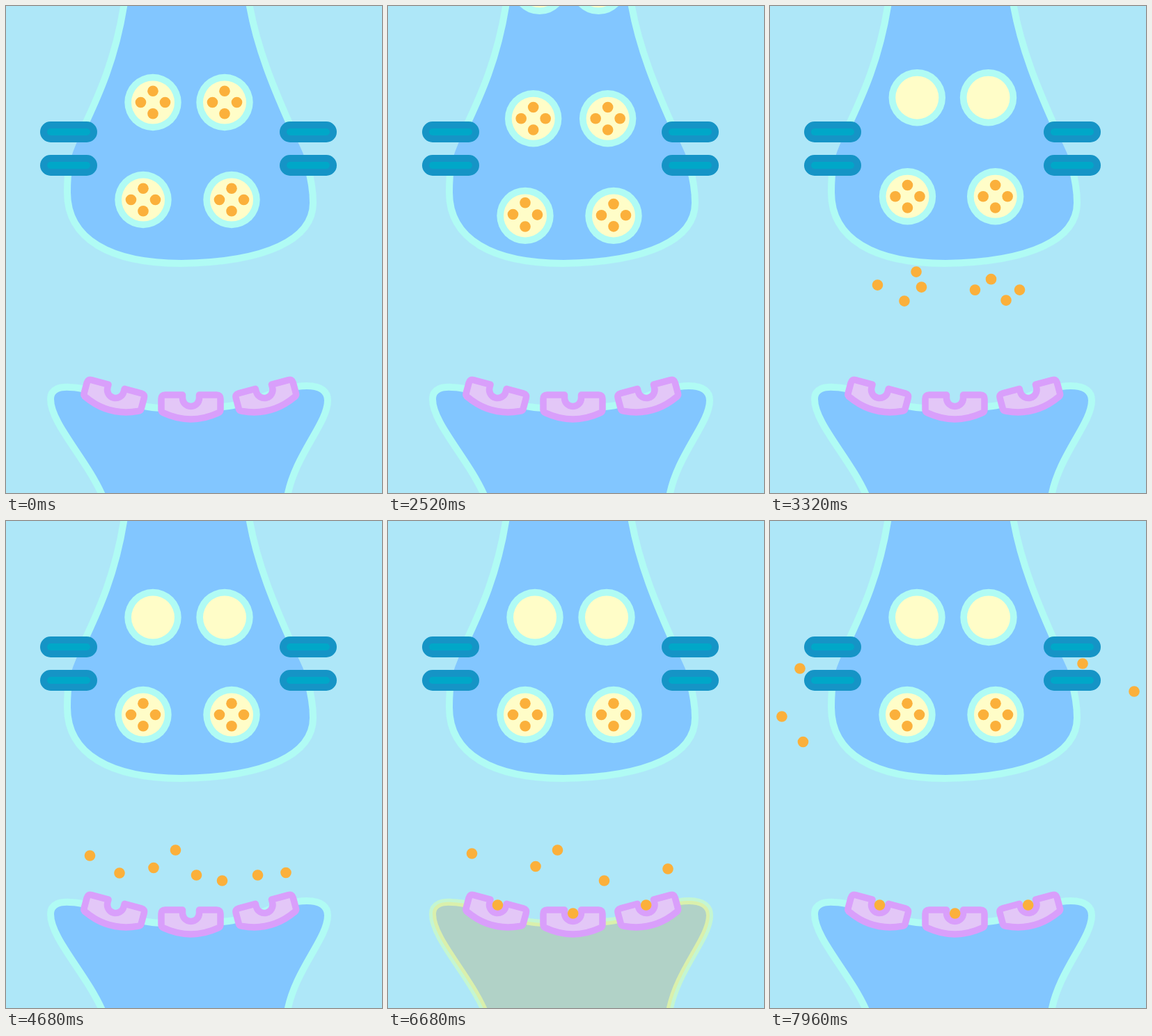
Recreate the animation shown at these times as an HTML page with a canvas. Size 540 by 700 pixels, loop 8 s.

```html
<!DOCTYPE html>
<html lang="en">
<head>
<meta charset="utf-8">
<title>Synapse</title>
<style>
html, body { margin: 0; width: 100%; height: 100%; overflow: hidden; background: #aee7f8; }
canvas { display: block; }
</style>
</head>
<body>
<canvas id="stage" width="540" height="700"></canvas>
<script>
const ctx = document.getElementById('stage').getContext('2d');
const LOOP = 8000;
const BG = '#aee7f8', CELL = '#82c6ff', MINT = '#b0fbf4', GLOW = '#ffe56a', DOT = '#fbb03b';

// Upper cell: two neck walls and a bowl, with gaps at the channels
const leftWall = 'M170 -5C157 80 130 135 109 180';
const rightWall = 'M413 182C385 120 360 60 349 -5';
const bowl = y => `91 228C88.5 241 88 255 88 268C88 335 150 ${y} 252 ${y}` +
  `C375 ${y - 2} 441 335 441 283C441 265 438 248 433 230`;
const cellPath = y => new Path2D(`${leftWall}C102 195 95 210 ${bowl(y)}C428 212 420 198 ${rightWall.slice(1)}Z`);
const wallPath = y => new Path2D(`${leftWall}M${bowl(y)}${rightWall}`);

const upper = { body: cellPath(370), wall: wallPath(370) };
const upperGlow = { body: cellPath(365), wall: wallPath(365) };
const lowerPath = new Path2D('M139 705C115 650 64 600 64 565C64 550 78 547 92 548' +
  'C130 549 160 572 210 577C240 580 290 579 320 575C360 570 395 546 432 546' +
  'C455 546 462 556 462 567C462 600 415 645 404 705');
const lower = { body: lowerPath, wall: lowerPath };

const receptor = new Path2D('M-42.5 1Q-42.5 -4.5 -37 -4.5H-12V0A12 12 0 0 0 12 0V-4.5H37' +
  'Q42.5 -4.5 42.5 1V17Q42.5 20 39 21.5Q0 39.5 -39 21.5Q-42.5 20 -42.5 17Z');
const receptors = [[157.5, 551.5, 15], [265.5, 563.5, 0], [371, 551.5, -15]];

const offsets = [[0, -16.3], [-17.5, 0], [17.5, 0], [0, 16.3]];
const docks = [[197, 278.5], [324, 278.5]];
const waiting = [[211, 138.5], [314, 138.5]];
const entries = [[219, -62], [300, -62]];

// Each dot: release point, floating point, bob [height, period], then a receptor or a drift curve
const dots = [
  { out: [210, 382], float: [243.5, 473], bob: [-4, 1000], drift: [100, 430, 47.5, 317.5] },
  { out: [154.5, 401], float: [120.5, 481], bob: [-3, 800], drift: [0, 330, 43, 212] },
  { out: [217.5, 404], float: [212, 498.5], bob: [-2, 800], drift: [70, 420, 17, 281] },
  { out: [193, 424], float: [163, 506], bob: [-2, 800], bind: [157.5, 552] },
  { out: [317.5, 392.5], float: [310.5, 517], bob: [2, 1000], drift: [420, 420, 523, 245] },
  { out: [294.5, 408], float: [273.5, 509], bob: [-2, 800], bind: [265.7, 564] },
  { out: [358.5, 408], float: [402, 505.5], bob: [-5.5, 800], drift: [500, 370, 449, 205] },
  { out: [339, 423], float: [361.5, 509], bob: [-2, 800], bind: [370.7, 552] }
];

const span = (t, a, b) => Math.min(1, Math.max(0, (t - a) / (b - a)));
const lerp = (a, b, k) => a + (b - a) * k;
const mix = (p, q, k) => [lerp(p[0], q[0], k), lerp(p[1], q[1], k)];

function disc([x, y], r, color) {
  ctx.beginPath();
  ctx.arc(x, y, r, 0, 7);
  ctx.fillStyle = color;
  ctx.fill();
}

function paint(path, fill, stroke, width) {
  if (fill) { ctx.fillStyle = fill; ctx.fill(path); }
  if (stroke) { ctx.strokeStyle = stroke; ctx.lineWidth = width; ctx.stroke(path); }
}

function bar(x, y, w, h, color) {
  ctx.beginPath();
  ctx.roundRect(x, y, w, h, h / 2);
  ctx.fillStyle = color;
  ctx.fill();
}

function glow(shape, t, start) {
  const mid = start + 425;
  const a = 0.85 * Math.min(span(t, start, mid), 1 - span(t, mid, mid + 425));
  if (a <= 0) return;
  ctx.globalAlpha = a;
  paint(shape.body, GLOW);
  ctx.globalAlpha = a * 0.65;
  paint(shape.wall, null, GLOW, 10);
  ctx.globalAlpha = 1;
}

function vesicle(center, full) {
  disc(center, 40.7, MINT);
  disc(center, 31, '#fffdc8');
  if (full) for (const [dx, dy] of offsets) disc([center[0] + dx, center[1] + dy], 7.8, DOT);
}

function dotAt(dot, i, t) {
  const dock = docks[i >> 2], off = offsets[i % 4];
  const home = [dock[0] + off[0], dock[1] + off[1]];
  if (t < 3320) {
    return [lerp(home[0], dot.out[0], span(t, 2920, 3320)), lerp(home[1], dot.out[1], span(t, 2355, 3320))];
  }
  const p = mix(dot.out, dot.float, span(t, 3320, 4210));
  const [height, period] = dot.bob;
  p[1] += height * span(t, 4210, 4510) * (1 - Math.cos(2 * Math.PI * (t - 4680) / period)) / 2;
  if (dot.bind) return mix(p, dot.bind, span(t, 4850, 5650));
  const [cx, cy, x, y] = dot.drift, u = span(t, 7180, 7960);
  return mix(mix(p, [cx, cy], u), mix([cx, cy], [x, y], u), u);
}

function draw(t) {
  ctx.fillStyle = BG;
  ctx.fillRect(0, 0, 540, 700);
  ctx.lineCap = ctx.lineJoin = 'round';

  for (const cell of [upper, lower]) {
    paint(cell.body, CELL);
    paint(cell.wall, null, MINT, 10);
  }
  for (const x of [49, 393]) for (const y of [166, 214]) {
    bar(x, y, 82, 30, '#1594c6');
    bar(x + 10, y + 10, 62, 10, '#00a7c8');
  }
  glow(upperGlow, t, 940);
  glow(lower, t, 6020);

  for (const [x, y, angle] of receptors) {
    ctx.save();
    ctx.translate(x, y);
    ctx.rotate(angle * Math.PI / 180);
    paint(receptor, '#e3c7f7', '#d99ffb', 9.5);
    ctx.restore();
  }

  const p = span(t, 2355, 3355);
  for (const i of [0, 1]) {
    ctx.globalAlpha = 1 - span(p, 0.3, 0.65);
    vesicle([docks[i][0], docks[i][1] + 138 * p], false);
    ctx.globalAlpha = 1;
    vesicle(mix(waiting[i], docks[i], p), true);
    vesicle(mix(entries[i], waiting[i], p), false);
  }
  dots.forEach((dot, i) => disc(dotAt(dot, i, t), 7.8, DOT));
}

const begin = performance.now();
function tick() {
  draw((performance.now() - begin) % LOOP);
  requestAnimationFrame(tick);
}
tick();
</script>
</body>
</html>
```
